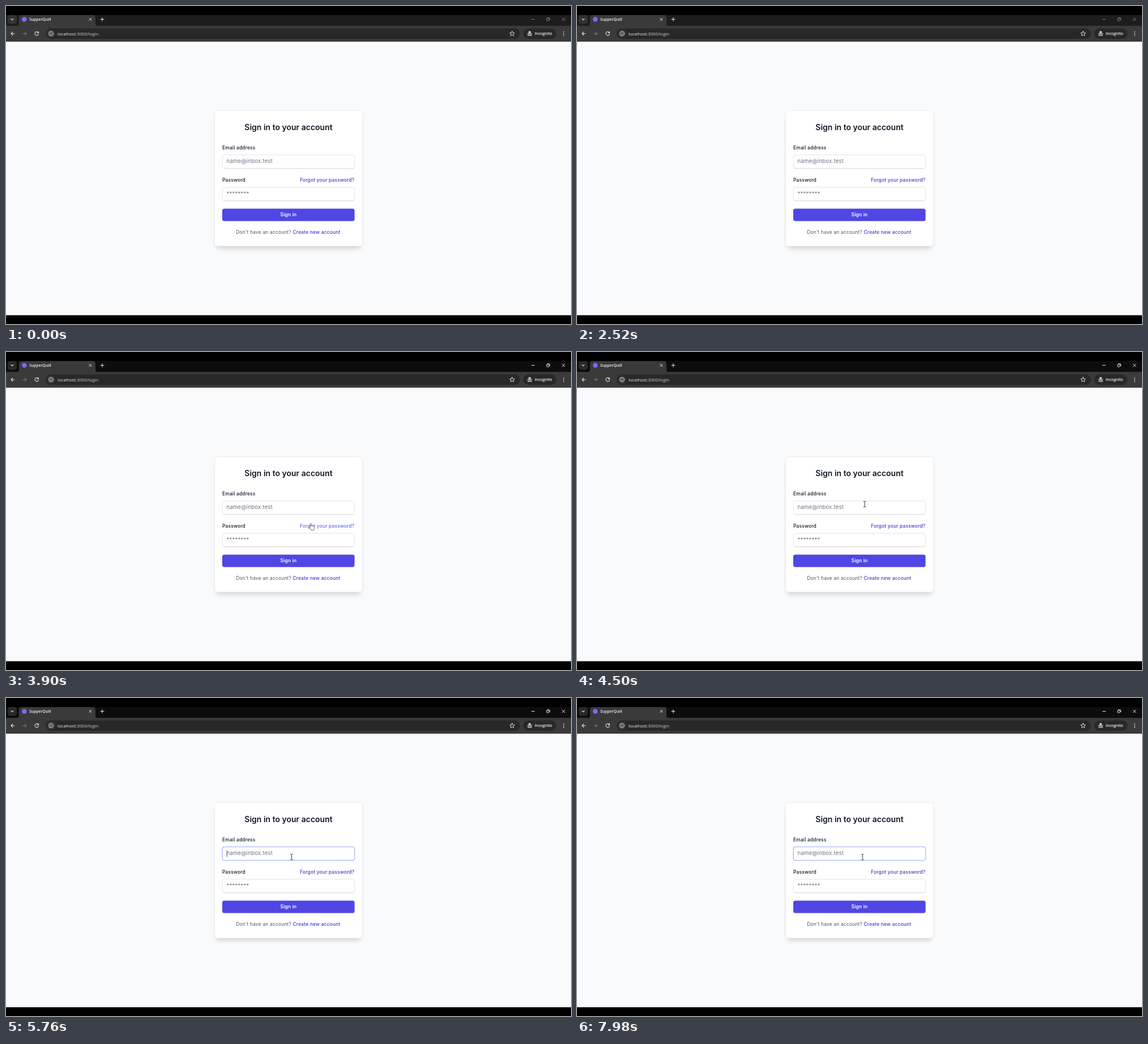
An HTML page that plays this animation: 998 px wide and 561 px high, repeating every 8 s.

```html
<!DOCTYPE html>
<html lang="en">
<head>
<meta charset="utf-8">
<title>Sign in</title>
<style>
  html, body { margin: 0; width: 100%; height: 100%; overflow: hidden; background: #000; }
  svg { display: block; width: 100vw; height: 100vh; }
  .ui { font-family: "Open Sans", "Noto Sans", sans-serif; fill: #f1f1f1; }
  .form { font-family: Inter, "Open Sans", sans-serif; font-size: 8.4px; letter-spacing: .025em; fill: #111827; }
  .link { fill: #4338ca; font-weight: 500; }
  .hint { font-size: 9.6px; fill: #6b7280; }
  .line { fill: none; stroke: #e8e8e8; stroke-linecap: round; stroke-linejoin: round; }
  .box { fill: #fff; stroke: #dcdfe5; stroke-width: .8; }
</style>
</head>
<body>
<svg viewBox="0 0 998 561">
  <defs>
    <filter id="soft" x="-10%" y="-10%" width="120%" height="125%"><feGaussianBlur stdDeviation="4"/></filter>
    <filter id="low" x="-5%" y="-30%" width="110%" height="170%"><feGaussianBlur stdDeviation=".6"/></filter>
  </defs>
  <rect width="998" height="561" fill="#000"/>

  <!-- Browser window -->
  <rect id="strip" y="16" width="998" height="20"/>
  <rect id="search" x="3" y="16" width="16" height="15.500" rx="4.500"/>
  <path class="line" d="M9 22.700l2 2 2-2" stroke-width="1.100"/>
  <path d="M18 36q5 0 5-5V21q0-5 5-5H153q5 0 5 5V31q0 5 5 5Z" fill="#3a3a3b"/>
  <rect y="35" width="998" height="28" fill="#3a3a3b"/>
  <path d="M0 62.600H998" stroke="#4b4b4c" stroke-width=".8"/>
  <circle cx="32.300" cy="23.500" r="4.300" fill="#8b62f5"/>
  <text class="ui" x="41" y="26.300" font-size="6.800" font-weight="600">SupperQuill</text>
  <path class="line" d="M147 21.500l4 4m0-4l-4 4M167 23.500h6m-3-3v6" stroke-width="1"/>
  <g id="controls" class="line" stroke-width=".9">
    <path d="M928.500 23.500h5M982.300 21l5 5m0-5l-5 5"/>
    <rect x="955" y="22" width="4" height="4" rx=".7"/>
    <path d="M956.500 20.700h3q1 0 1 1v3"/>
  </g>
  <path class="line" d="M15 48.700H9m2.800-2.800L9 48.700l2.800 2.800M57 46.700A3.300 3.300 0 1 0 57.400 49.600M57.400 45.200v2.200h-2.200" stroke-width="1.100"/>
  <path class="line" d="M30 48.700h6m-2.800-2.800L36 48.700l-2.800 2.800" stroke-width="1" style="stroke:#858585"/>
  <rect x="70" y="39.500" width="838" height="18.500" rx="9.250" fill="#282828"/>
  <circle cx="79.500" cy="48.700" r="7" fill="#3a3a3b"/>
  <circle class="line" cx="79.500" cy="48.700" r="3.700" stroke-width="1"/>
  <path class="line" d="M79.500 48.600v1.900M79.500 46.700v.1" stroke-width="1"/>
  <text class="ui" x="91" y="51.700" font-size="7.700">localhost<tspan fill="#d0d0d0">:3000/login</tspan></text>
  <path class="line" d="M894 44.400l1.250 2.800 3.050.3-2.300 2 .7 3-2.700-1.600-2.700 1.600.7-3-2.300-2 3.050-.3Z" stroke-width=".9"/>
  <rect x="913.500" y="39.500" width="58.500" height="18.500" rx="9.250" fill="#282828"/>
  <path class="line" d="M921 48.500h8M925.800 51q-.8-.6-1.600 0" stroke-width=".9"/>
  <path d="M922.700 47.500l.8-3h3l.8 3Z" fill="#e8e8e8"/>
  <g class="line" stroke-width=".9"><circle cx="922.900" cy="51.300" r="1.300"/><circle cx="927.100" cy="51.300" r="1.300"/></g>
  <text class="ui" x="934" y="51.200" font-size="6.800" font-weight="600">Incognito</text>
  <path class="line" d="M985 45.500v.1M985 48.700v.1M985 51.900v.1" stroke-width="1.700"/>

  <!-- Sign-in page -->
  <rect y="63" width="998" height="482.500" fill="#f9fafb"/>
  <rect x="371" y="192" width="256" height="236" rx="7" fill="#000" opacity=".15" filter="url(#soft)"/>
  <rect x="368.500" y="184.500" width="261" height="239" rx="5" fill="#fff" stroke="#e5e7eb" stroke-width=".8"/>
  <g class="form">
    <text x="499" y="219" font-size="14" font-weight="600" text-anchor="middle" letter-spacing="0" style="letter-spacing:0">Sign in to your account</text>
    <text x="382" y="253.300" font-weight="500">Email address</text>
    <rect x="383" y="264" width="232" height="23.500" rx="3.500" fill="#000" opacity=".1" filter="url(#low)"/>
    <rect id="ring" x="381.300" y="261.700" width="235.200" height="25.600" rx="4.200" fill="#c3cafc"/>
    <rect id="email" class="box" x="382.400" y="262.700" width="233.200" height="23.600" rx="3.500"/>
    <text class="hint" x="389.500" y="277.300">name@inbox.test</text>
    <path id="caret" d="M390.300 268.500v12" stroke="#222" stroke-width=".7"/>
    <text x="382" y="310.300" font-weight="500">Password</text>
    <text id="forgot" class="link" x="615.500" y="310.300" text-anchor="end">Forgot your password?</text>
    <rect x="383" y="321" width="232" height="23.500" rx="3.500" fill="#000" opacity=".1" filter="url(#low)"/>
    <rect class="box" x="382.400" y="319.700" width="233.200" height="23.600" rx="3.500"/>
    <text class="hint" x="389.500" y="334">********</text>
    <rect x="383" y="359" width="232" height="21" rx="3.500" fill="#000" opacity=".15" filter="url(#low)"/>
    <rect x="382" y="357.500" width="233.700" height="21.700" rx="3.500" fill="#4f46e5"/>
    <text x="499" y="371.300" text-anchor="middle" font-weight="600" style="fill:#fff">Sign in</text>
    <text x="504" y="402" text-anchor="end" style="fill:#4b5563">Don't have an account?</text>
    <text class="link" x="506.500" y="402">Create new account</text>
  </g>

  <!-- Pointer shapes, each drawn around its hot spot -->
  <g id="pointer">
    <path id="arrow" d="M0 0V9.500L2.300 7.400 3.800 10.800 5.200 10.200 3.800 6.900H6.800Z" fill="#fff" stroke="#222" stroke-width=".7"/>
    <path id="hand" d="M-1 .5Q0-.7 1 .5V4.300L2 4Q2.700 3.900 3 4.500L4 4.300Q4.600 4.300 4.900 5L5.600 4.900Q6.500 5 6.500 6V8.300L5.400 10.700V11.800H.2V10.700L-3 7Q-3.300 5.900-2.300 5.700L-1 6.800Z" fill="#fff" stroke="#333" stroke-width=".7" stroke-linejoin="round"/>
    <path id="beam" d="M-2.300-4.800H-.7Q0-4.700 0-4 0-4.700.7-4.800H2.300M-2.300 4.800H-.7Q0 4.700 0 4 0 4.700.7 4.800H2.300M0-4V4" fill="none" stroke="#222" stroke-width=".9"/>
  </g>
</svg>
<script>
  const LOOP = 8000, ACTIVE = 3600, FOCUS = 5360, BLINK = 500;
  // time, x, y of the pointer
  const path = [
    [3600, 566, 316], [3840, 538.500, 302.500], [4180, 538.500, 302.500],
    [4480, 508, 268.500], [4620, 508, 268.500], [4900, 504.500, 280.500]
  ];
  const $ = id => document.getElementById(id);
  const show = (id, on) => $(id).setAttribute("visibility", on ? "visible" : "hidden");
  const ease = p => p * p * (3 - 2 * p);

  function pointerAt(t) {
    const i = path.findIndex(k => k[0] > t);
    if (i < 0) return path[path.length - 1].slice(1);
    if (i === 0) return path[0].slice(1);
    const [t0, x0, y0] = path[i - 1], [t1, x1, y1] = path[i];
    const p = ease((t - t0) / (t1 - t0));
    return [x0 + (x1 - x0) * p, y0 + (y1 - y0) * p];
  }

  function draw(t) {
    const active = t >= ACTIVE, focused = t >= FOCUS;
    const [x, y] = pointerAt(t);
    const overLink = active && y >= 301 && y < 318;
    const overInput = y >= 262 && y < 287;

    $("strip").setAttribute("fill", active ? "#0d0d0e" : "#1d1d1e");
    $("search").setAttribute("fill", active ? "#29292a" : "#333334");
    $("controls").style.stroke = active ? "#fff" : "#8a8a8a";
    $("forgot").style.fill = overLink ? "#6366f1" : "";
    $("email").style.stroke = focused ? "#a5b0fb" : "";
    show("ring", focused);
    show("caret", focused && Math.floor((t - FOCUS) / BLINK) % 2 === 0);

    $("pointer").setAttribute("transform", `translate(${x} ${y})`);
    show("hand", active && overLink);
    show("beam", active && overInput);
    show("arrow", active && !overLink && !overInput);
  }

  function tick() {
    draw(performance.now() % LOOP);
    requestAnimationFrame(tick);
  }
  tick();
</script>
</body>
</html>
```
